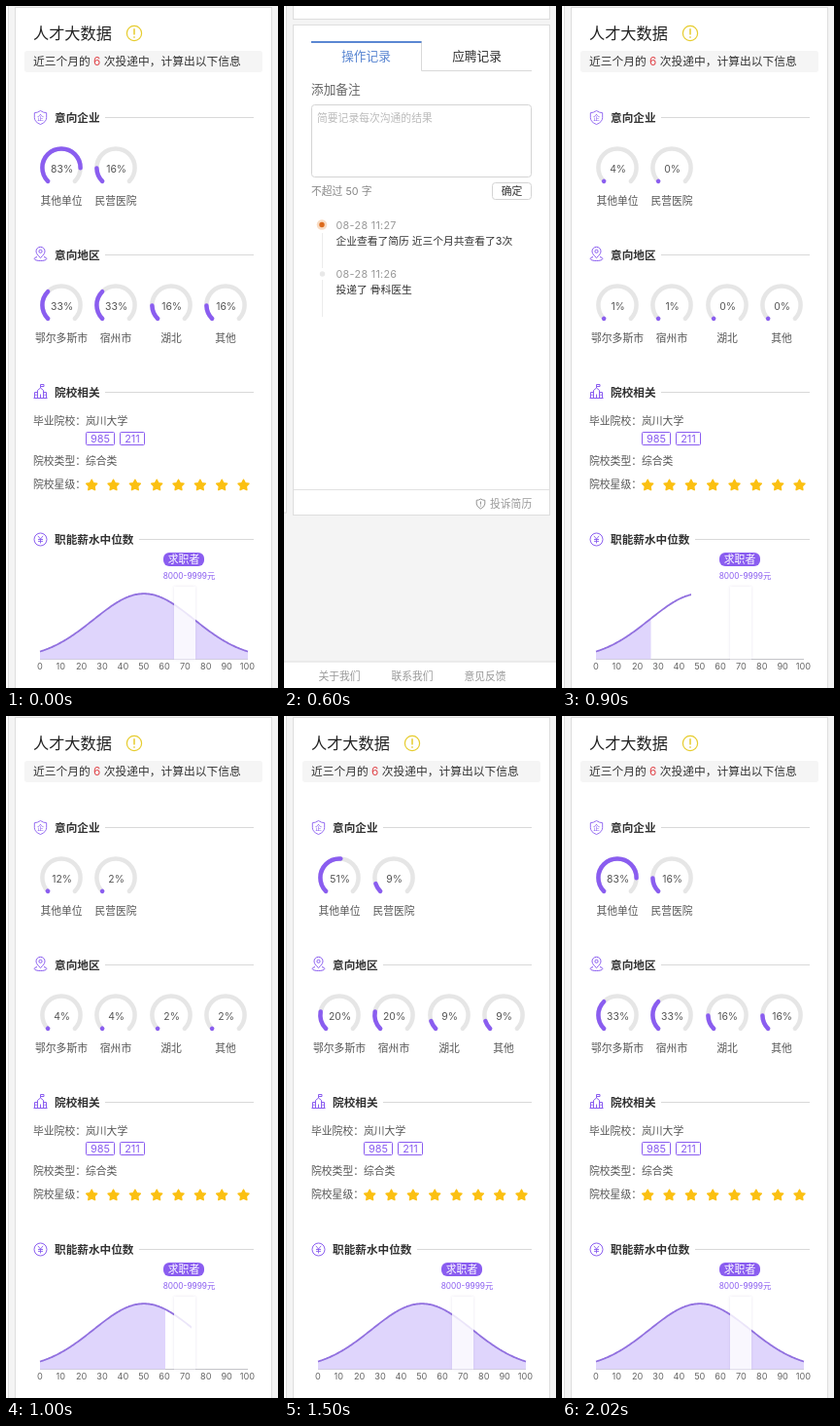
These frames come from a looping animation (280x700 px, 2140 ms). An HTML page:

```html
<!DOCTYPE html>
<html lang="zh-CN">
<head>
<meta charset="utf-8">
<style>
html, body { margin: 0; width: 100%; height: 100%; overflow: hidden; background: #f4f4f4; }
svg { display: block; width: 280px; height: 700px; }
text { font-family: Inter, "Noto Sans CJK SC", "Noto Sans CJK", sans-serif; white-space: pre; }
</style>
</head>
<body>
<svg id="stage" viewBox="0 0 280 700" xmlns="http://www.w3.org/2000/svg"></svg>
<script>
const LOOP = 2140;
const PURPLE = '#8a5df0', GREY = '#d9d9d9', BASE = 670.5;
const stage = document.getElementById('stage');

const attrs = o => Object.entries(o).map(([k, v]) => ` ${k}="${v}"`).join('');
const tag = (name, o, body = '') => `<${name}${attrs(o)}>${body}</${name}>`;
const text = (x, y, s, size = 10.8, fill = '#555', more = {}) =>
  tag('text', { x, y, 'font-size': size, fill, ...more }, s);
const mid = (x, y, s, size, fill, more = {}) =>
  text(x, y, s, size, fill, { 'text-anchor': 'middle', ...more });
const rect = (x, y, width, height, fill, more = {}) =>
  tag('rect', { x, y, width, height, fill, ...more });
const dot = (cx, cy, r, fill, more = {}) => tag('circle', { cx, cy, r, fill, ...more });
const path = (d, stroke, width = 1, more = {}) =>
  tag('path', { d, stroke, 'stroke-width': width, fill: 'none', ...more });
const clamp = v => Math.max(0, Math.min(1, v));

// Gauges: [centre x, centre y, final percent, label]
const gauges = [
  [57, 166, 83, '其他单位'], [113, 166, 16, '民营医院'],
  [57, 307, 33, '鄂尔多斯市'], [113, 307, 33, '宿州市'],
  [170, 307, 16, '湖北'], [226, 307, 16, '其他']
];
const RADIUS = 19.6, SWEEP = RADIUS * Math.PI * 1.5;

function gauge([x, y, , label]) {
  const k = RADIUS * Math.SQRT1_2;
  const d = `M${x - k} ${y + k}A${RADIUS} ${RADIUS} 0 1 1 ${x + k} ${y + k}`;
  const cap = { 'stroke-linecap': 'round' };
  return path(d, '#e6e6e6', 4.5, cap) +
    path(d, PURPLE, 4.5, { ...cap, class: 'arc' }) +
    mid(x + .6, y + 5, '', 10.4, '#555', { class: 'pct' }) +
    mid(x, y + 38.3, label);
}

function heading(y, title, lineX) {
  return text(50, y + 4.4, title, 11.65, '#333', { 'font-weight': 600 }) +
    path(`M${lineX} ${y}H255`, GREY);
}

function star(x, y) {
  let p = '';
  for (let i = 0; i < 10; i++) {
    const r = i % 2 ? 3 : 5.8, a = (i / 5 - .5) * Math.PI;
    p += `${x + r * Math.cos(a)},${y + r * Math.sin(a)} `;
  }
  return tag('polygon', { points: p, fill: '#fbc012', stroke: '#fbc012', 'stroke-width': 1.4, 'stroke-linejoin': 'round' });
}

function icons() {
  return path('M35.5 107.5Q38.5 109.6 41.7 109.7V114.5Q41.5 119.3 35.5 121.5Q29.5 119.3 29.3 114.5V109.7Q32.5 109.6 35.5 107.5Z', PURPLE, .9) +
    mid(35.5, 117, '企', 7, PURPLE) +
    path('M35.5 258.6C32.5 255.6 31 253.8 31 251.8A4.5 4.5 0 0 1 40 251.8C40 253.8 38.5 255.6 35.5 258.6Z', PURPLE) +
    dot(35.5, 251.8, 1.6, 'none', { stroke: PURPLE }) +
    path('M32 257.5Q29.2 258.2 29.2 259.4C29.2 262.2 41.8 262.2 41.8 259.4Q41.8 258.2 39 257.5', PURPLE) +
    path('M28.5 402.5H42.5M29.5 402V396.5H32.5M41.5 402V396.5H38.5M32.5 402V394.5L35.5 392L38.5 394.5V402M35.5 392V388.5H39V390.5H35.5M35.5 402V398.5M31 400V398.5M40 400V398.5', PURPLE) +
    dot(35.5, 547.5, 6.5, 'none', { stroke: PURPLE }) +
    path('M32.8 543.8L35.5 547L38.2 543.8M35.5 547V551.5M33 547.5H38M33 549.4H38', PURPLE, .9);
}

const curve = x => BASE - 67.3 * Math.exp(-.5 * ((x - 142) / 51.7) ** 2);

function chart() {
  let line = '';
  for (let x = 35; x <= 249; x++) line += `${x > 35 ? 'L' : 'M'}${x} ${curve(x).toFixed(2)}`;
  const clip = id => tag('clipPath', { id }, rect(34, 590, 216, 90, '#000', { id: id + 'Box' }));
  let out = tag('defs', {}, clip('area') + clip('stroke') +
    tag('filter', { id: 'soft', x: '-40%', width: '180%' },
      tag('feDropShadow', { dx: 0, dy: 0, stdDeviation: 1.5, 'flood-color': '#8070b0', 'flood-opacity': .22 })));
  out += path(`M35 ${BASE}H249`, '#c4c4c8');
  out += tag('path', { d: `${line}V${BASE}H35Z`, fill: '#dfd5fc', 'clip-path': 'url(#area)' });
  out += path(line, '#9170df', 1.8, { 'clip-path': 'url(#stroke)' });
  out += rect(173, 596, 22, 74.5, '#fff', { opacity: .82, filter: 'url(#soft)' });
  for (let i = 0; i <= 10; i++) out += mid(35 + 21.35 * i, 681, i * 10, 9.2, '#666');
  return out;
}

function resume() {
  let out = rect(-5, -5, 7.5, 720, '#fff', { stroke: '#dedede' }) +
    rect(9.5, 1.5, 264, 720, '#fff', { stroke: '#dedede' }) +
    text(28, 34, '人才大数据', 16.2, '#222') +
    dot(132, 28, 7.6, 'none', { stroke: '#e6cc2e', 'stroke-width': 1.2 }) +
    path('M132 23.3V29.5M132 31.2V32.8', '#e6cc2e', 1.5) +
    rect(19, 46, 245, 22, '#f5f5f5', { rx: 3 }) +
    text(28, 61, '近三个月的 <tspan fill="#e0454a">6</tspan> 次投递中，计算出以下信息', 11.75, '#333') +
    heading(114.5, '意向企业', 102) + heading(255.5, '意向地区', 102) +
    heading(396.5, '院校相关', 102) + heading(547.5, '职能薪水中位数', 137) +
    icons() + gauges.map(gauge).join('');
  [['毕业院校：', '岚川大学', 430], ['院校类型：', '综合类', 471], ['院校星级：', '', 495]]
    .forEach(([k, v, y]) => out += text(28, y, k) + text(82, y, v));
  [[82.5, 29, '985'], [117.5, 25, '211']].forEach(([x, w, s]) =>
    out += rect(x, 437.5, w, 13, 'none', { stroke: PURPLE, rx: 1 }) + mid(x + w / 2, 448, s, 11, PURPLE));
  for (let i = 0; i < 8; i++) out += star(88.2 + 22.33 * i, 492);
  return out + rect(162, 561, 42, 14, PURPLE, { rx: 6 }) + mid(183, 572, '求职者', 10.8, '#fff') +
    mid(188.5, 588, '8000-9999元', 8.3, PURPLE) + chart();
}

function records() {
  const edge = { stroke: '#dedede' }, field = { stroke: '#d4d4d4', rx: 3 };
  const shade = '#999', spaced = { 'letter-spacing': .3 };
  return rect(-5, -60, 7.5, 562, '#fff', edge) +
    rect(9.5, -60, 264, 55.5, '#fff', edge) +
    rect(9.5, 1.5, 264, 503, '#fff', edge) +
    path('M10 478.5H273', '#e2e2e2') +
    path('M141.5 18V48.5H255', GREY) + path('M28 19H141.5', '#5b87d2', 2) +
    mid(84.5, 38, '操作记录', 12.7, '#5b87d2') + mid(198.5, 38, '应聘记录', 12.7, '#333') +
    text(28, 72.3, '添加备注', 12.7, '#666') +
    rect(28.5, 83.5, 226, 74, '#fff', field) +
    text(34, 101, '简要记录每次沟通的结果', 10.8, '#bbb') +
    text(28, 176, '不超过 50 字', 10.8, '#888') +
    rect(214.5, 163.5, 40, 17, '#fff', field) + mid(234.5, 176, '确定', 10.8, '#333') +
    path('M39.5 215V251M39.5 263V301', '#ececec') +
    dot(39, 206.5, 5.3, '#f8dcc4') + dot(39, 206.5, 2.7, '#dc6a1c') + dot(39.5, 257, 2.7, '#e8e8e8') +
    text(53.5, 211, '08-28 11:27', 10.8, shade, spaced) +
    text(53.5, 227.3, '企业查看了简历 近三个月共查看了3次', 10.75, '#333') +
    text(53.5, 261, '08-28 11:26', 10.8, shade, spaced) +
    text(53.5, 277.3, '投递了 骨科医生', 10.75, '#333') +
    path('M202.5 488Q204.5 489.3 206.8 489.3V493Q206.5 496.3 202.5 498Q198.5 496.3 198.2 493V489.3Q200.5 489.3 202.5 488ZM202.5 490.5V493.6M202.5 494.6V495.6', '#888', .9) +
    text(212, 497.2, '投诉简历', 10.8, shade) +
    rect(0, 655, 280, 31, '#fff') + path('M0 655H280', '#dcdcdc') +
    mid(57, 674.3, '关于我们', 10.8, shade) + mid(132, 674.3, '联系我们', 10.8, shade) +
    mid(207, 674.3, '意见反馈', 10.8, shade);
}

stage.innerHTML = rect(0, 0, 280, 700, '#f4f4f4') +
  tag('g', { id: 'resume' }, resume()) + tag('g', { id: 'records' }, records());

const get = id => document.getElementById(id);
const top1 = get('resume'), top2 = get('records');
const areaBox = get('areaBox'), strokeBox = get('strokeBox');
const arcs = stage.querySelectorAll('.arc'), pcts = stage.querySelectorAll('.pct');

// The picture advances in 100 ms steps, with one longer step near the end.
const step = t => t >= 2020 ? 2020 : Math.min(1900, Math.floor(t / 100) * 100);
const reveal = (t, start) => 1 - (1 - clamp((t - start) / 600)) ** 3;

function draw(ms) {
  const t = step(ms % LOOP);
  const scrolled = t >= 600 && t < 900;
  top1.style.display = scrolled ? 'none' : '';
  top2.style.display = scrolled ? '' : 'none';
  top2.setAttribute('transform', `translate(0 ${t < 700 ? 18 : 0})`);

  const first = t < 600;
  const p = first ? 1 : clamp((t - 844) / 1065);
  const u = clamp((t - 950) / 450);
  const lag = first ? 1 : u * u * (3 - 2 * u);
  gauges.forEach(([, , value], i) => {
    pcts[i].textContent = Math.floor(value * p) + '%';
    const len = Math.max(.01, SWEEP * value / 100 * p * lag);
    arcs[i].setAttribute('stroke-dasharray', `${len} 999`);
  });
  areaBox.setAttribute('width', 1 + 215 * (first ? 1 : reveal(t, 842)));
  strokeBox.setAttribute('width', 1 + 215 * (first ? 1 : reveal(t, 790)));
}

const began = performance.now();
function tick() {
  draw(performance.now() - began);
  requestAnimationFrame(tick);
}
tick();
</script>
</body>
</html>
```
